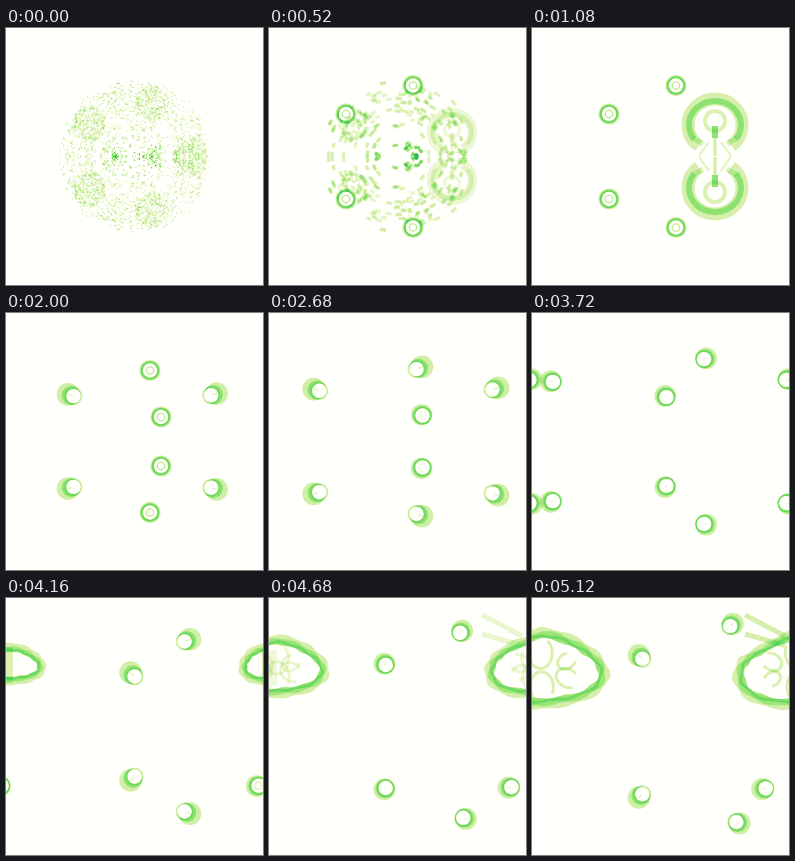
An HTML page with a canvas for the animation above (5.16 s loop, 257 by 257 pixels).

```html
<!DOCTYPE html>
<html lang="en">
<head>
<meta charset="utf-8">
<title>Gliders</title>
<style>
html, body { margin: 0; width: 100%; height: 100%; overflow: hidden; background: #fffffb; }
canvas { display: block; width: 100vw; height: 100vh; }
</style>
</head>
<body>
<canvas id="stage" width="257" height="257"></canvas>
<script>
const SIZE = 257, LOOP = 5160, TAU = Math.PI * 2;
const stage = document.getElementById('stage').getContext('2d');
const makeLayer = () => Object.assign(document.createElement('canvas'), { width: SIZE, height: SIZE })
  .getContext('2d', { willReadFrequently: true });
const density = makeLayer(), soft = makeLayer();
const lerp = (a, b, k) => a + (b - a) * k;
const ramp = (t, from, to) => Math.min(1, Math.max(0, (t - from) / (to - from)));

// Density to colour: paper, pale green, green, teal.
const COLOURS = [[255, 255, 251], [220, 240, 178], [158, 229, 120], [88, 212, 90], [0, 150, 130]];
const palette = Array.from({ length: 256 }, (_, i) => {
  const v = i / 255 * 4, n = Math.min(3, Math.floor(v));
  return COLOURS[n].map((c, j) => lerp(c, COLOURS[n + 1][j], v - n));
});

function stroke(width, alpha, trace) {
  if (alpha <= 0) return;
  density.globalAlpha = alpha;
  density.lineWidth = width;
  density.beginPath();
  trace();
  density.stroke();
}

function fill(alpha, trace) {
  density.globalAlpha = Math.max(0, alpha);
  density.beginPath();
  trace();
  density.fill();
}

function punch(alpha, trace) {
  density.globalCompositeOperation = 'destination-out';
  fill(alpha, trace);
  density.globalCompositeOperation = 'source-over';
}

const circle = (x, y, r) => () => density.arc(x, y, r, 0, TAU);
const line = (x, y, u, v) => () => { density.moveTo(x, y); density.lineTo(u, v); };

// Each glider rests at (x, y) until launch, then cruises at (vx, vy) px per second.
const GLIDERS = [
  { x: 77, y: 86, vx: -25.5, vy: -7.8, launch: 1450, from: 300, to: 4080 },
  { x: 144, y: 57.5, vx: 21, vy: -8.5, launch: 2300, from: 300, to: 4360 },
  { x: 155, y: 104, vx: -18.6, vy: -18, launch: 2560, from: 1450, period: 1040, peak: 3200 },
  { x: 203, y: 83, vx: 27, vy: -8.5, launch: 1750, from: 1400, to: 4080 },
  { x: 251, y: 69, vx: -21, vy: -3, launch: 4160, from: 3880, side: 'bottom' },
  { x: 184, y: 41.5, vx: 24, vy: -10, launch: 4160, from: 4160, side: 'bottom' },
  { x: 184, y: 41.5, vx: 17, vy: -16, launch: 4160, from: 4160, side: 'top' },
];

function glider({ x, y, vx, vy, launch, from, to = LOOP + 200, period = 740, peak = 2700 }, t) {
  const fade = ramp(t, from, from + 200) * ramp(t, to, to - 200);
  if (!fade) return;
  const speed = Math.hypot(vx, vy), age = Math.max(0, t - launch) / 1000;
  const cx = x + vx * age, cy = y + vy * age;
  const moving = ramp(t, launch - 100, launch + 200);
  const offset = moving * (4.2 + 2.3 * Math.cos((t - peak) / period * TAU));
  const dx = vx / speed * offset, dy = vy / speed * offset;
  const hx = cx - dx * .75, hy = cy - dy * .75;

  fill(.3 * fade, circle(cx + dx * .15, cy + dy * .15, 10.6 + offset * .12));
  fill(.38 * fade, circle(cx - dx * .4, cy - dy * .4, 9.6));
  stroke(2, .3 * fade, circle(hx, hy, 8));
  punch(fade, circle(hx, hy, 7.2));
  stroke(1.3, .38 * (1 - moving) * fade, circle(hx, hy, 3.7));
  stroke(1.3, .22 * moving * fade, line(hx + dx * .2, hy + dy * .2, hx + dx, hy + dy));
}

// Opening specks: short arcs in a disc and around five rim clusters, coarsening as they die out.
function specks(t) {
  const age = t / 760;
  if (age >= 1) return;
  let seed = 7;
  const random = () => (seed = seed * 16807 % 2147483647) / 2147483647;
  const count = 2100 * (1 - age) ** 2;
  for (let i = 0; i < count; i++) {
    let x = 129, y = 128, r = 74 * Math.sqrt(random()) * (.93 + .12 * random());
    let tone = .2 + .3 * random();
    if (i % 3 === 0) {
      const spoke = Math.floor(random() * 5) / 5 * TAU;
      x += 56 * Math.cos(spoke);
      y += 56 * Math.sin(spoke);
      r = 17 * Math.sqrt(random());
    } else if (i % 16 === 1) {
      x += random() < .5 ? -22 : 18;
      r = 14 * random() ** 1.5;
      tone = .95;
    } else if (r < 42) {
      if (random() < .5) continue;
      tone += .5 * (1 - r / 42);
    }
    const angle = random() * TAU;
    stroke(.8 + age * 3.5, tone * lerp(1, .5, age), () =>
      density.arc(x, y, r, angle, angle + (.8 + random() * 1.8 + age * 6) / (r + 1)));
  }
}

// Arched lobe on the right; its halves shrink apart onto the two gliders they become.
function lobe(t) {
  const grow = ramp(t, 240, 850), k = ramp(t, 1120, 1700), scale = lerp(.55, 1, grow);
  const alpha = grow * ramp(t, 1800, 1500), inner = grow * ramp(t, 1450, 1100);
  if (!alpha) return;
  density.save();
  density.translate(183, 128);
  density.scale(scale, scale);
  for (const [x, y, side] of [[155, 104, -1], [203, 83, 1]]) {
    const cx = lerp(0, x - 183, k), cy = lerp(-31, y - 128, k);
    const half = (rx, ry, reach) => () => density.ellipse(cx, cy, lerp(rx, 9, k), lerp(ry, 9, k), 0,
      -Math.PI / 2, -Math.PI / 2 + side * lerp(reach, TAU, k), side < 0);
    stroke(lerp(13, 5, k), .27 * alpha, half(27, 26, 2.5));
    stroke(lerp(6, 3, k), .4 * alpha, half(26, 24, 2.2));
    stroke(5, .22 * inner, line(side * 12, -12, side * 22, -18));
    stroke(2, .22 * inner, line(side * 6, -14, side * 16, 0));
  }
  stroke(4, .24 * inner, circle(0, -35, 10));
  stroke(6, .55 * inner, line(0, -30, 0, -18));
  stroke(3, .3 * inner, line(0, -18, 0, 0));
  density.restore();
}

// Merged mass over the wrapped edge: a bumpy oval shell with a few inner cells.
function mass(t) {
  const alpha = ramp(t, 3840, 4080), k = ramp(t, 4160, 5120);
  if (!alpha) return;
  const cx = lerp(7, 9, k), cy = lerp(67, 72, k), rx = lerp(32, 66, k), ry = lerp(21, 41, k);
  const shell = inset => () => {
    for (let a = 0; a < TAU; a += .06) {
      const bump = 1 + .05 * Math.sin(3 * a + .6) + .02 * Math.sin(11 * a + inset + t / 200);
      const wide = rx * bump - inset, dent = Math.cos(a) < 0 && Math.sin(a) < 0 ? 1 - .3 * k * Math.sin(2 * a) : 1;
      density.lineTo(cx + wide * Math.cos(a), cy + (ry * bump - inset) * Math.sin(a) * dent);
    }
    density.closePath();
  };
  fill(.28 * alpha, shell(0));
  fill(.3 * alpha, shell(3.5));
  punch(alpha, shell(lerp(8.5, 11, k)));
  stroke(3, .35 * alpha, shell(lerp(7, 8, k)));

  stroke(8, .25 * alpha * (1 - k), line(cx - 4, cy - 18, cx - 4, cy + 18));
  for (let i = 0; i < 6; i++) {
    const a = i / 6 * TAU + .5, r = 9 + 3 * Math.sin(i * 2);
    stroke(3, .26 * k, () => density.ellipse(cx + 30 * k * Math.cos(a), cy + 17 * k * Math.sin(a), r * 1.3, r, a, .7, 5.2));
  }
  for (const gap of [0, 19]) stroke(5, .28 * k, line(-44, 17 + gap, -4, 38 + gap * .5));
}

function scene(t, side) {
  specks(t);
  lobe(t);
  if (side === 'top') mass(t);
  for (const g of GLIDERS) if (!g.side || g.side === side) glider(g, t);
}

function render(t) {
  density.setTransform(1, 0, 0, 1, 0, 0);
  density.clearRect(0, 0, SIZE, SIZE);
  for (const shift of t < 2600 ? [0] : [-SIZE, 0, SIZE]) {
    density.setTransform(1, 0, 0, 1, shift, 0);
    scene(t, 'top');
    density.setTransform(1, 0, 0, -1, shift, SIZE);
    scene(t, 'bottom');
  }
  soft.clearRect(0, 0, SIZE, SIZE);
  soft.filter = t ? `blur(${Math.min(.7, t / 600)}px)` : 'none';
  soft.drawImage(density.canvas, 0, 0);

  const image = soft.getImageData(0, 0, SIZE, SIZE), pixels = image.data;
  for (let i = 0; i < pixels.length; i += 4) {
    pixels.set(palette[pixels[i + 3]], i);
    pixels[i + 3] = 255;
  }
  stage.putImageData(image, 0, 0);
}

let shown = -1;
const origin = performance.now();
function tick() {
  const now = (performance.now() - origin) % LOOP;
  const t = now < 80 ? 0 : Math.floor(now / 40) * 40;
  if (t !== shown) render(shown = t);
  requestAnimationFrame(tick);
}
tick();
</script>
</body>
</html>
```
